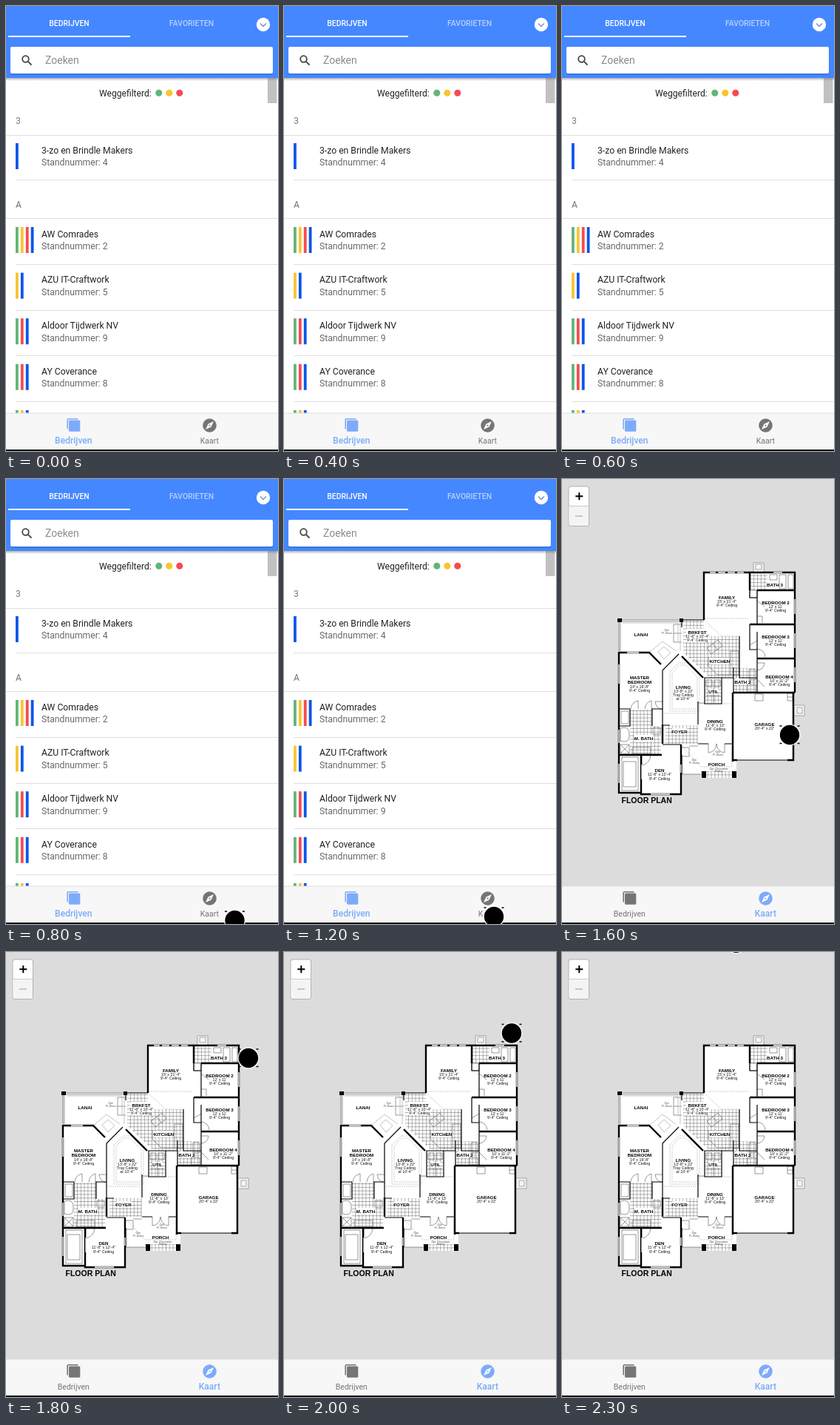
Recreate the animation shown at these times as an HTML page. Size 368x600 px, loop 2500 ms.

```html
<!DOCTYPE html>
<html lang="nl">
<head>
<meta charset="utf-8">
<style>
html, body { margin: 0; width: 100%; height: 100%; overflow: hidden; background: #fff; }
svg { display: block; width: 368px; height: 600px; font-family: Roboto, sans-serif; }
.plan { font-family: "Liberation Sans", Arial, sans-serif; text-anchor: middle; }
.plan path { fill: none; stroke: #000; }
.plan .wall { stroke-width: 2.4; }
.plan .inner { stroke-width: 1.2; }
.plan .thin { stroke: #555; stroke-width: .6; }
.plan .faint { stroke: #aaa; stroke-width: .7; }
.plan .pad { fill: #f4f4f4; stroke: #777; stroke-width: .6; }
.plan .post { fill: #000; stroke: none; }
.plan .glass { stroke: #fff; stroke-width: 1.3; }
.plan .dash { stroke: #aaa; stroke-width: .6; stroke-dasharray: 2 1; }
.plan .tile { fill: url(#tile); stroke: none; }
.room { font-weight: 700; font-size: 6.2px; }
.size { font-size: 5.3px; fill: #111; }
.note { font-size: 3.6px; font-style: italic; fill: #444; }
</style>
</head>
<body>
<svg viewBox="0 0 368 600">
  <defs>
    <pattern id="tile" width="4.8" height="4.8" patternUnits="userSpaceOnUse">
      <path d="M0 .4H4.8M.4 0V4.8" style="stroke:#666;stroke-width:.55"/>
    </pattern>
    <linearGradient id="shade" x2="0" y2="1">
      <stop stop-color="#777" stop-opacity=".55"/><stop offset="1" stop-color="#777" stop-opacity="0"/>
    </linearGradient>
    <clipPath id="view"><rect y="97" width="368" height="452"/></clipPath>
  </defs>
  <g id="list"></g>
  <g id="map"></g>
  <g id="tabs">
    <rect y="549" width="368" height="49" fill="#f7f7f7"/>
    <path d="M0 549H368" stroke="#dedede"/>
    <g id="companyTab">
      <path d="M83.2 570.5V558Q83.2 556.8 84.4 556.8H97.5" fill="none" stroke="currentColor" stroke-width="1.6"/>
      <rect x="85" y="558.5" width="15.3" height="15.3" rx="1.5" fill="currentColor"/>
      <text x="91.3" y="590" text-anchor="middle" fill="currentColor">Bedrijven</text>
    </g>
    <g id="mapTab">
      <circle cx="275.5" cy="565.5" r="9.3" fill="currentColor"/>
      <path d="M281 560L277.5 567.5L270 571L273.5 563.5Z" fill="#fff"/>
      <circle cx="275.5" cy="565.5" r="1.1" fill="currentColor"/>
      <text x="275.3" y="590" text-anchor="middle" fill="currentColor">Kaart</text>
    </g>
    <rect y="598" width="368" height="2" fill="#0b0b0d"/>
  </g>
  <g id="pointer">
    <circle r="14.6" fill="#fff" fill-opacity=".85"/>
    <circle r="13.2"/>
    <path d="M-13.5 -12h3M10.5 -12h3M-13.5 11.5h3M10.5 11.5h3" stroke="#000" stroke-width="1.4"/>
  </g>
</svg>
<script>
const $ = id => document.getElementById(id);
const text = (x, y, s, size, fill, more = '') =>
  `<text x="${x}" y="${y}" font-size="${size}" fill="${fill}" ${more}>${s}</text>`;
const rect = (x, y, w, h, fill, more = '') =>
  `<rect x="${x}" y="${y}" width="${w}" height="${h}" fill="${fill}" ${more}/>`;
const line = (x, y) => `<path d="M${x} ${y}H368" stroke="#dfdfdf"/>`;

const colors = { g: '#61b577', y: '#f7c530', r: '#f64a52', b: '#0b55e8' };

function bars(y, keys) {
  return [...keys].map((k, i) => rect(13 + i * 6.9, y, 3.8, 35, colors[k])).join('');
}

function company(y, name, stand, keys) {
  return bars(y + 11, keys) + text(48, y + 24.7, name, 12.2, '#222') +
    text(48, y + 41.3, 'Standnummer: ' + stand, 12.2, '#686868');
}

function buildList() {
  const companies = [
    ['AW Comrades', 2, 'gyrb'],
    ['AZU IT-Craftwork', 5, 'yb'],
    ['Aldoor Tijdwerk NV', 9, 'grb'],
    ['AY Coverance', 8, 'grb'],
  ];
  const rows = companies.map((c, i) => {
    const y = 287 + i * 61.6;
    return company(y, ...c) + line(13, Math.round(y + 61) + .5);
  }).join('');
  const dots = ['g', 'y', 'r'].map((k, i) =>
    `<circle cx="${206.8 + i * 14}" cy="117.3" r="4.5" fill="${colors[k]}"/>`).join('');
  const label = 'text-anchor="middle" font-weight="500"';
  return rect(0, 0, 368, 600, '#fff') +
    `<g clip-path="url(#view)">` +
    text(126, 122, 'Weggefilterd:', 12.1, '#222') + dots +
    text(13, 159, '3', 12.2, '#777') + line(0, 174.5) +
    company(174, '3-zo en Brindle Makers', 4, 'b') + line(13, 234.5) +
    text(13, 272, 'A', 12.2, '#777') + line(0, 286.5) +
    rows + bars(545, 'gyb') + rect(354, 97, 12.5, 34, '#c1c1c1') + '</g>' +
    rect(0, 0, 368, 97, '#4587ff') + rect(0, 97, 368, 4, 'url(#shade)') +
    text(85.5, 27, 'BEDRIJVEN', 10.4, '#fff', label) +
    text(251, 27, 'FAVORIETEN', 10.4, '#b5d0ff', label) +
    rect(3, 40, 165, 2, '#fff') +
    `<circle cx="348" cy="25" r="9.2" fill="#fff"/>
     <path d="M344 23.5L348 27.5L352 23.5" fill="none" stroke="#6b8fc9" stroke-width="1.3"/>` +
    rect(6, 56, 355, 37, '#326bc9', 'rx="2" opacity=".55"') +
    rect(6, 55, 355, 36, '#fff', 'rx="2"') +
    `<g fill="none" stroke="#444" stroke-width="1.8"><circle cx="26.5" cy="71.5" r="4.3"/>
     <path d="M29.8 74.8L34.5 79.5"/></g>` +
    text(53, 78, 'Zoeken', 14, '#8b8b8b');
}

const path = (kind, d) => `<path class="${kind}" d="${d}"/>`;

function room(x, y, title, ...sizes) {
  return `<text class="room" x="${x}" y="${y}">${title}</text>` + sizes.map((s, i) =>
    `<text class="size" x="${x}" y="${y + 5.4 + i * 5.1}">${s}</text>`).join('');
}

const note = (x, y, ...rows) => rows.map((s, i) =>
  `<text class="note" x="${x}" y="${y + i * 3.8}">${s}</text>`).join('');

function buildPlan() {
  const high = '9\'-4" Ceiling';
  const floor = `<path d="M192 126H315V288H313V379H236V403H188V398H161V424H78V190H192Z" style="fill:#fff;stroke:none"/>`;
  const tiles = path('tile', 'M164 190H192V212H240V268H200L164 234Z') +
    path('tile', 'M254 128H278V150H254Z') +
    path('tile', 'M233 255H263V287H233Z') +
    path('tile', 'M140 332H184V357H140Z') +
    path('tile', 'M92 311H122V333H134V371H92Z') +
    path('tile', 'M194 270H215V302H194Z') +
    path('tile', 'M188 394H236V403H188Z');
  const blanks = [[168, 202, 30, 18], [201, 241, 25, 9], [98, 345, 25, 9],
    [149, 336, 20, 8], [277, 139, 21, 7], [235, 269, 19, 8], [198, 283, 14, 8]]
    .map(b => rect(...b, '#fff')).join('');
  const pads = path('pad', 'M259 125V113H273V125M262 115H270V122H262Z') +
    path('pad', 'M315 305H328V319H315M318 308H325V316H318Z');
  const walls =
    path('wall', 'M192 190V126H315V288M254 126V150M264 150H315M254 196H315M264 242H315M231 288H315') +
    path('wall', 'M77 234H118L134 250M77 233V423H107M107 372V425H161V358M77 372H107M106 372H135') +
    path('wall', 'M231 288V379H237M305 379H313V288M231 358V381M136 331V357M191 268L162 239') +
    path('inner', 'M162 190H192M162 190V200M136 258V332H146M136 358H161M136 310H121M92 310H77M92 310V333H77M122 310V333') +
    path('inner', 'M264 150V196M264 206V242M254 150V160H264M254 196V230H264M264 242V288M240 212V268H264M232 254V288') +
    path('inner', 'M193 268H216V303H193ZM184 300V331M184 357H198M220 357H231M231 300V358M162 372V398M212 268H232') +
    path('inner', 'M136 258L158 236M237 379H305') +
    path('post', 'M189 394H195V403H189ZM230 394H236V403H230ZM75 188H81V193H75ZM159 188H164V193H159Z');
  const windows = path('glass',
    'M200 126H208M211 126H221M224 126H234M237 126H246M286 126H298M315 162V182M315 208V228M315 254V274' +
    'M77 250V276M77 338V356M88 234H104M120 425H146M77 384V410M161 385V396M108 385V405');
  const details =
    path('thin', 'M281 129H291V136H281ZM294 129H303V148H294ZM306 129H313V148H306ZM254 150H264V160H254Z') +
    path('thin', 'M77 190H160M79 192H160M77 190V232M79 192V232M81 375H103V420H81ZM83 381H100V415H83Z') +
    path('thin', 'M196 228L211 217L217 225L202 236ZM204 222L210 230M228 232H239V264H228ZM198 240V252L210 264H228') +
    path('thin', 'M195 271H203V280H195ZM206 271H214V280H206ZM195 292H214M205 280V302M253 257H262V271H253ZM251 277H262V287H251Z') +
    path('thin', 'M79 336Q92 332 91 345Q92 357 79 353ZM79 358H91V370H79ZM79 358L91 370M79 370L91 358M80 313H90V330H80ZM123 335H133V344H123ZM95 362H120V370H95Z') +
    path('thin', 'M261 290H272V299H261ZM305 289H312V299H305ZM305 294H312') +
    path('thin', 'M121 310V299Q113 301 112 310M103 310V299Q94 301 93 310M136 300H126Q127 309 136 311M108 372V386Q119 384 120 372') +
    path('thin', 'M198 357V369Q208 368 209 357Q210 368 220 369V357M264 164L274 172M264 185H271V194M264 218L254 224M264 229Q274 230 275 240M264 248H274Q273 257 264 258M264 270L274 280') +
    path('thin', 'M162 196H151V220H162M151 208H162M184 302H193M162 362H172V374H162M161 398H188M172 360H184') +
    path('faint', 'M118 234L136 219L154 232M130 233L138 226L147 234L138 243ZM160 192V232M82 194H157V220') +
    path('dash', 'M146 260L158 248H169L186 265V313H146ZM149 262L159 251H168L183 267V310H149Z') +
    path('dash', 'M193 188H252M138 316H183M186 303H229M240 212H216L192 190M164 362L188 388H230V360');
  const rooms =
    room(223, 161.5, 'FAMILY', '15\' x 21\'-4"', high) +
    room(289, 168.5, 'BEDROOM 2', "12' x 11'", high) +
    room(289, 214.5, 'BEDROOM 3', "12' x 11'", high) +
    room(294, 268.5, 'BEDROOM 4', '10\' x 11\'-2"', high) +
    room(288, 145, 'BATH 3') + room(107, 212, 'LANAI') +
    room(183, 208.5, 'BRKFST', '11\'-6" x 10\'-4"', high) +
    room(213.5, 248, 'KITCHEN') + room(105, 270, 'MASTER') +
    room(105, 276.3, 'BEDROOM', '14\' x 16\'-8"', high) +
    room(164, 282.5, 'LIVING', '13\'-8" x 22\'', 'Tray Ceiling', 'at 10\'-4"') +
    room(205, 289, 'UTIL') + room(244.5, 275.5, 'BATH 2') +
    room(207, 328.5, 'DINING', '11\'-6" x 13\'', high) +
    room(274, 333, 'GARAGE', '20\'-4" x 22\'') +
    room(159, 342.5, 'FOYER') + room(110.5, 352, 'M. BATH') +
    room(132, 395, 'DEN', '11\'-8" x 12\'-4"', high) + room(209, 386.5, 'PORCH') +
    note(142, 205, 'Opt.', 'Fl. Doors') + note(179, 380, 'Opt.', 'Fl. Doors') +
    note(211, 369, 'Opt.', 'Fl. Doors') + note(212, 391.5, 'Opt. Decorative', 'Railing');
  return '<g class="plan">' + floor + tiles + blanks + pads + details + walls + windows + rooms + '</g>' +
    text(80.5, 437, 'FLOOR PLAN', 10.5, '#000',
      'font-weight="700" style="font-family:\'Liberation Sans\',Arial,sans-serif"');
}

function buildMap() {
  return rect(0, 0, 368, 600, '#dcdcdc') + buildPlan() +
    rect(8.5, 9.5, 28.5, 54.5, '#b2b2b2', 'rx="4"') +
    rect(9.5, 10.5, 26.5, 52.5, '#fff', 'rx="3"') +
    `<path d="M9.5 37H36V60Q36 63 33 63H12.5Q9.5 63 9.5 60Z" fill="#f4f4f4"/>
     <path d="M9.5 36.5H36" stroke="#ccc"/>
     <path d="M18.3 23.3H28.3M23.3 18.3V28.3" stroke="#000" stroke-width="2"/>
     <path d="M18 50H28" stroke="#bbb" stroke-width="1.6"/>`;
}

$('list').innerHTML = buildList();
$('map').innerHTML = buildMap();

const LOOP = 2500, STEP = 100, SWITCH = 1300;
// time, x, y of the pointer
const route = [
  [0, 345, 625], [600, 345, 625], [700, 328, 612], [800, 309.5, 595], [900, 298, 591],
  [1000, 284, 590], [1400, 284, 590], [1500, 291, 515], [1600, 308, 345], [1700, 323, 200],
  [1800, 328, 143], [1900, 326, 137], [2100, 290, 82], [2300, 235.5, -12.3], [2500, 235.5, -12.3],
];

function pointerAt(t) {
  const i = route.findIndex(p => p[0] > t);
  const [a, b] = [route[i - 1], route[i]];
  const k = (t - a[0]) / (b[0] - a[0]);
  return [a[1] + (b[1] - a[1]) * k, a[2] + (b[2] - a[2]) * k];
}

function styleTab(id, active, grow) {
  const tab = $(id), label = tab.querySelector('text');
  tab.style.color = active ? '#7dabfa' : '#757575';
  label.setAttribute('font-size', 10.5 + 1.6 * grow);
  label.setAttribute('font-weight', active ? 500 : 400);
}

function draw(time) {
  const t = Math.floor(time % LOOP / STEP) * STEP;
  const onMap = t >= SWITCH;
  const grow = Math.min(1, Math.max(0, (t - SWITCH) / 200));
  $('list').style.display = onMap ? 'none' : '';
  $('map').style.display = onMap ? '' : 'none';
  styleTab('companyTab', !onMap, 1 - grow);
  styleTab('mapTab', onMap, grow);
  $('pointer').setAttribute('transform', `translate(${pointerAt(t)})`);
}

const start = performance.now();
function tick() {
  draw(performance.now() - start);
  requestAnimationFrame(tick);
}
tick();
</script>
</body>
</html>
```
